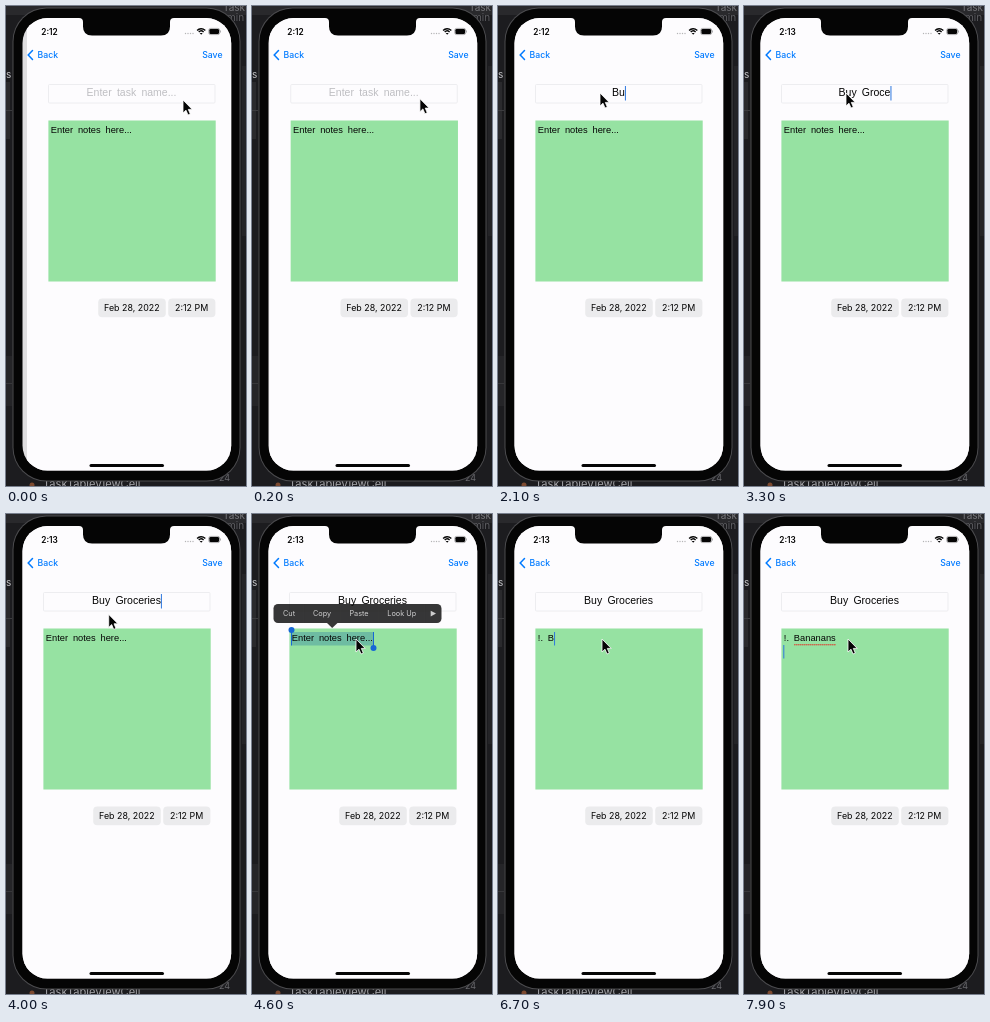
Animation, 240 px wide and 480 px high, one loop 8 s. Source, as an HTML page with a canvas:

```html
<!DOCTYPE html>
<html lang="en">
<head>
<meta charset="utf-8">
<title>Task form</title>
<style>
  html, body { margin: 0; width: 100%; height: 100%; overflow: hidden; background: #1c1c1f; }
  canvas { display: block; width: 240px; height: 480px; }
</style>
</head>
<body>
<canvas id="stage"></canvas>
<script>
const LOOP = 8000, STEP = 100;
const UI = 'Inter, sans-serif';
const BODY = '"Liberation Sans", Arial, sans-serif';
const TITLE_FONT = `10.5px ${BODY}`, NOTES_FONT = `9.3px ${BODY}`;
const BLUE = '#007aff', CARET = '#2f78de', PAGE = '#fdfcfe', INK = '#050505';
const WORD_GAP = '2.3px';

const canvas = document.getElementById('stage');
const ctx = canvas.getContext('2d');
const dpr = window.devicePixelRatio || 1;
canvas.width = 240 * dpr;
canvas.height = 480 * dpr;

// Each entry is the moment one more character appears.
const title = {
  text: 'Buy Groceries',
  times: [1900, 2100, 2300, 2400, 2700, 2800, 2900, 3100, 3300, 3400, 3500, 3600, 3700]
};
const notes = {
  text: '!. Bananans\n',
  times: [6200, 6300, 6400, 6700, 6900, 7000, 7100, 7300, 7400, 7500, 7700, 7800]
};
// time, x, y
const pointerPath = [
  [0, 177, 94], [600, 142, 89], [900, 142, 89], [1000, 124, 86],
  [1400, 102, 87], [3800, 102, 87], [4300, 104, 125], [LOOP, 104, 125]
];

const clamp = v => Math.max(0, Math.min(1, v));
const typed = (entry, t) => entry.text.slice(0, entry.times.filter(k => k <= t).length);

function box(x, y, w, h, r, color) {
  ctx.beginPath();
  ctx.roundRect(x, y, w, h, r);
  ctx.fillStyle = color;
  ctx.fill();
}

function rect(x, y, w, h, color) {
  ctx.fillStyle = color;
  ctx.fillRect(x, y, w, h);
}

function disc(x, y, r, color) {
  ctx.beginPath();
  ctx.arc(x, y, r, 0, Math.PI * 2);
  ctx.fillStyle = color;
  ctx.fill();
}

function poly(points, color) {
  ctx.beginPath();
  points.forEach(([x, y]) => ctx.lineTo(x, y));
  ctx.closePath();
  ctx.fillStyle = color;
  ctx.fill();
}

function label(text, x, y, font, color, align = 'left') {
  ctx.font = font;
  ctx.textAlign = align;
  ctx.fillStyle = color;
  ctx.fillText(text, x, y);
}

function drawDesktop() {
  rect(0, 0, 240, 480, '#1c1c1f');
  rect(0, 0, 240, 9, '#29292c');
  rect(0, 76, 4, 57, '#2a2a2d');
  rect(0, 104, 6, 1, '#3c3c3f');
  rect(0, 350, 6, 50, '#252528');
  rect(0, 377, 6, 1, '#38383b');
  rect(236, 60, 4, 170, '#242427');
  label('Task', 217, 5, `10px ${UI}`, '#77777b');
  label('min', 221, 15, `10px ${UI}`, '#5c5c60');
  label('s', 0, 72, `10px ${UI}`, '#c9c9cc');
  label('24', 213, 475, `9px ${UI}`, '#69696d');
  disc(26, 479, 2.5, '#7d4a30');
  label('TaskTableViewCell', 37, 482, `11.1px ${UI}`, '#a5a5a9');
}

function drawPhone() {
  box(6.5, 1.5, 228, 474, 34, '#4c4c4f');
  box(7.5, 2.5, 226, 472, 33, INK);
}

function clipScreen() {
  ctx.beginPath();
  ctx.roundRect(16.5, 12, 208.7, 452.6, 25);
  ctx.clip();
}

function drawNotch() {
  const left = 77, right = 164, top = 12, bottom = 29.6, flare = 4, round = 9;
  ctx.beginPath();
  ctx.moveTo(left - flare, top - 1);
  ctx.lineTo(left - flare, top);
  ctx.quadraticCurveTo(left, top, left, top + flare);
  ctx.lineTo(left, bottom - round);
  ctx.quadraticCurveTo(left, bottom, left + round, bottom);
  ctx.lineTo(right - round, bottom);
  ctx.quadraticCurveTo(right, bottom, right, bottom - round);
  ctx.lineTo(right, top + flare);
  ctx.quadraticCurveTo(right, top, right + flare, top);
  ctx.lineTo(right + flare, top - 1);
  ctx.fillStyle = INK;
  ctx.fill();
}

function drawStatus(t) {
  label(t < 2700 ? '2:12' : '2:13', 35.3, 28.6, `600 8.3px ${UI}`, INK);
  for (let i = 0; i < 4; i++) disc(179.5 + i * 2.5, 27.5, 0.7, '#b4b4b6');

  ctx.strokeStyle = INK;
  ctx.lineWidth = 1.4;
  for (const r of [3.4, 5.6]) {
    ctx.beginPath();
    ctx.arc(195.2, 28.4, r, -Math.PI * 0.76, -Math.PI * 0.24);
    ctx.stroke();
  }
  poly([[195.2, 28.8], [193.7, 27], [196.7, 27]], INK);

  ctx.lineWidth = 0.6;
  ctx.strokeStyle = '#77777a';
  ctx.beginPath();
  ctx.roundRect(202.8, 22.4, 10.8, 6.2, 1.8);
  ctx.stroke();
  box(203.4, 23, 9.6, 5, 1.2, INK);
  rect(214.2, 24.5, 0.7, 2, '#8d8d90');
}

function drawNav() {
  ctx.beginPath();
  ctx.moveTo(26.5, 44.6);
  ctx.lineTo(22.2, 49);
  ctx.lineTo(26.5, 53.4);
  ctx.strokeStyle = BLUE;
  ctx.lineWidth = 1.5;
  ctx.lineCap = 'round';
  ctx.stroke();
  ctx.lineCap = 'butt';
  const font = `500 8.7px ${UI}`;
  label('Back', 31.6, 52.2, font, BLUE);
  label('Save', 216.5, 52.2, font, BLUE, 'right');
}

function drawTitle(t) {
  ctx.strokeStyle = '#ededf0';
  ctx.lineWidth = 1;
  ctx.beginPath();
  ctx.roundRect(37.5, 78.5, 166.5, 18.5, 1);
  ctx.stroke();

  const text = typed(title, t);
  label(text || 'Enter task name...', 120.5, 90, TITLE_FONT, text ? INK : '#bebec2', 'center');
  if (t >= 1600 && t < 4300) {
    const half = ctx.measureText(text).width / 2;
    rect(120.5 + half, 80, 1, 14.5, CARET);
  }
}

function drawNotes(t) {
  rect(37.4, 114.5, 167.3, 161, '#96e2a2');
  const left = 39.8;
  const selected = t >= 4500 && t < 6200;
  if (selected) rect(39.5, 118, 82, 13.5, 'rgba(30,110,160,.33)');

  const text = typed(notes, t);
  label(text ? text.trimEnd() : 'Enter notes here...', left, 127, NOTES_FONT, INK);

  if (selected) {
    rect(39, 117, 1, 14.5, '#1767d6');
    rect(121, 118, 1, 14.5, '#1767d6');
    disc(39.5, 116, 3, '#1767d6');
    disc(121.5, 134, 3, '#1767d6');
  } else if (text.endsWith('\n')) {
    const start = left + ctx.measureText('!. ').width;
    for (let x = start + 1; x < 92; x += 2) disc(x, 130.7, 0.75, '#e0362c');
    rect(39.3, 131, 1, 13.5, CARET);
  } else if (text) {
    rect(left + ctx.measureText(text).width, 118, 1, 13.5, CARET);
  } else if (t >= 4300) {
    rect(121.5, 118, 1, 13.5, CARET);
  }
}

function drawDate() {
  const font = `8.9px ${UI}`;
  box(87.2, 292.5, 67.6, 18.7, 4, '#ebebed');
  box(157.2, 292.5, 47.2, 18.7, 4, '#ebebed');
  label('Feb 28, 2022', 120.8, 305.2, font, INK, 'center');
  label('2:12 PM', 180.6, 305.2, font, INK, 'center');
}

function drawMenu(t) {
  const alpha = Math.min(clamp((t - 4400) / 250), clamp((6200 - t) / 200));
  if (!alpha) return;
  ctx.save();
  ctx.globalAlpha = alpha;
  box(21.5, 90, 168, 19, 4.5, INK);
  poly([[75, 109], [85.5, 109], [80.2, 114]], INK);
  for (const x of [51.5, 88, 126, 172.5]) rect(x, 90, 0.6, 19, '#3a3a3a');
  const items = [['Cut', 37], ['Copy', 70], ['Paste', 107], ['Look Up', 149.7]];
  for (const [text, x] of items) label(text, x, 102.2, `7.3px ${UI}`, '#f4f4f4', 'center');
  poly([[178.7, 96.8], [184, 99.6], [178.7, 102.4]], '#f4f4f4');
  ctx.restore();
}

function drawPointer(t) {
  const i = pointerPath.findIndex(p => p[0] > t);
  const [t0, x0, y0] = pointerPath[i - 1];
  const [t1, x1, y1] = pointerPath[i];
  const u = (t - t0) / (t1 - t0);
  const e = u * u * (3 - 2 * u);
  ctx.save();
  ctx.translate(x0 + (x1 - x0) * e, y0 + (y1 - y0) * e);
  poly([[0, 0], [0, 13], [3, 10.2], [5, 15], [7.3, 14], [5.3, 9.4], [9.2, 9.4]], INK);
  ctx.strokeStyle = '#fff';
  ctx.lineWidth = 0.8;
  ctx.stroke();
  ctx.restore();
}

function draw(t) {
  ctx.setTransform(dpr, 0, 0, dpr, 0, 0);
  drawDesktop();
  drawPhone();

  ctx.save();
  clipScreen();
  const slide = t < 600 ? 5 * Math.pow(0.5, t / 100) : 0;
  rect(16, 12, 211, 453, '#dfdee0');
  rect(16 + slide, 12, 211, 453, PAGE);
  ctx.save();
  ctx.translate(slide, 0);
  ctx.wordSpacing = WORD_GAP;
  drawTitle(t);
  drawNotes(t);
  ctx.wordSpacing = '0px';
  drawDate();
  ctx.restore();
  drawNav();
  drawNotch();
  drawStatus(t);
  box(83.5, 458, 74.5, 3, 1.5, INK);
  ctx.restore();

  drawMenu(t);
  drawPointer(t);
}

const begin = performance.now();
function tick() {
  const ms = (performance.now() - begin) % LOOP;
  draw(Math.floor(ms / STEP) * STEP);
  requestAnimationFrame(tick);
}
tick();
</script>
</body>
</html>
```
